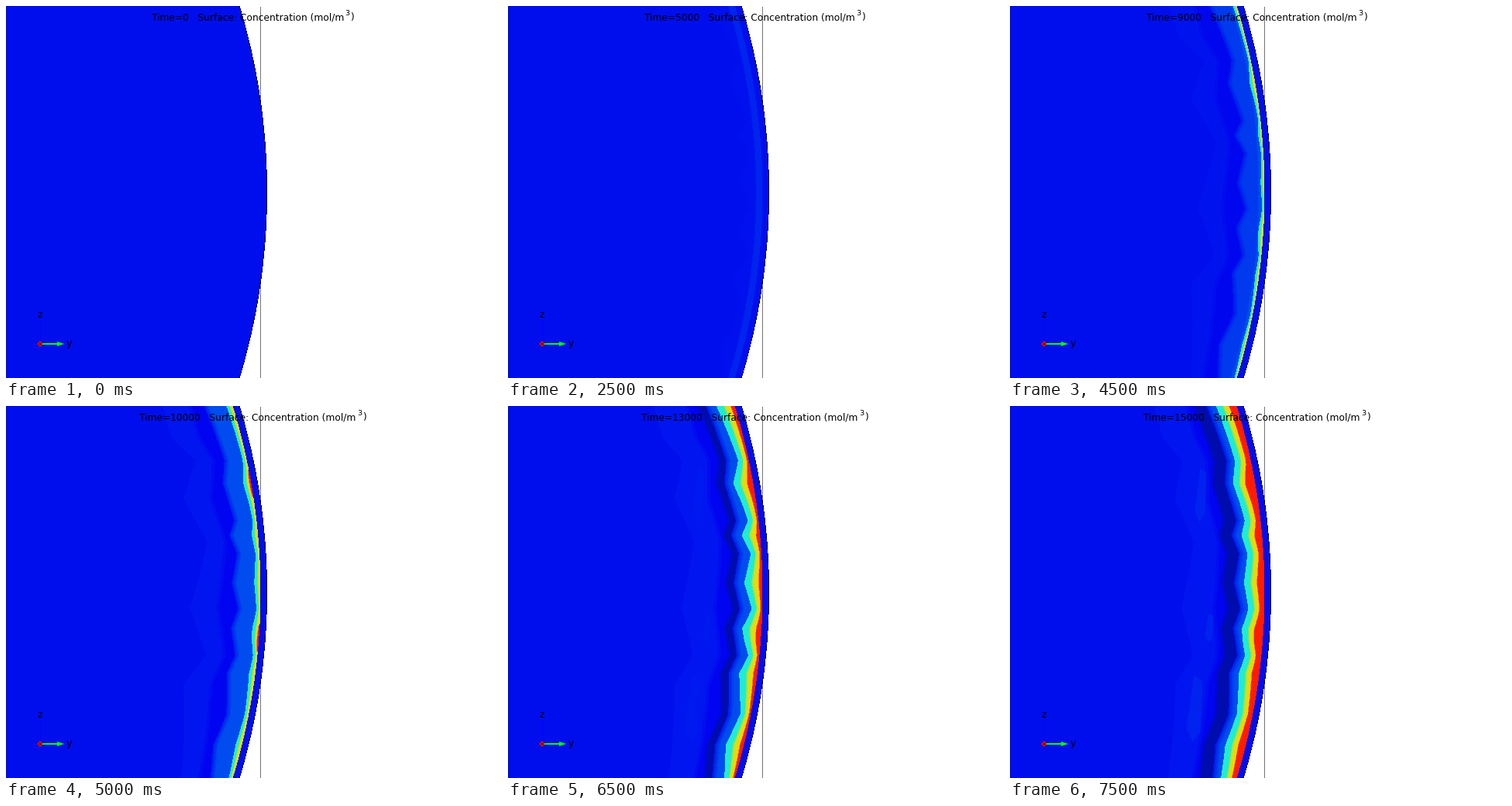
Animation of 640x480 px, one loop 8000 ms. Source, as a matplotlib script:

```python
import numpy as np
import matplotlib.pyplot as plt
from matplotlib.animation import ArtistAnimation
from matplotlib.patches import Circle, Polygon

W, H, DPI = 640, 480, 100
PX = 72 / DPI
STEPS, STEP_MS = 16, 500

BLUE, FAINT, DEEP = (0, 14, 238), (0, 21, 240), (0, 4, 240)
DARK, MID, CYAN = (0, 12, 172), (0, 76, 238), (32, 236, 208)
GREEN, YELLOW, ORANGE, RED = (140, 230, 96), (224, 220, 14), (255, 140, 0), (255, 28, 0)

rows = np.arange(0, H + 1)


def arc(tip, radius):
    return tip - radius + np.sqrt(radius**2 - (rows - 240) ** 2)


def zigzag(*turns):
    """Triangle wave along y: 1 at even turning points, 0 at odd ones."""
    return np.interp(rows, turns, [1 - i % 2 for i in range(len(turns))])


def ramp(t, start, end):
    return float(np.clip((t - start) / (end - start), 0, 1))


def lerp(a, b, f):
    return a + (b - a) * f


def mix(a, b, f):
    return tuple(lerp(p, q, f) for p, q in zip(a, b))


def rgb(color):
    return tuple(c / 255 for c in color)


outer, inner = arc(336.5, 829), arc(328, 820.5)
# The coarse mesh makes every front crooked at the same heights.
mesh = zigzag(0, 70, 100, 148, 167, 190, 228, 262, 287, 322, 345, 398, 438, 480)
lobes = zigzag(40, 70, 120, 175, 260, 322, 360, 480)
spots = sum(np.exp(-(((rows - y) / 20) ** 2)) for y in (100, 300))


def cyan_front(t):
    base = 20 * ramp(t, 7000, 15000) ** 1.5
    sway = np.interp(t, [7000, 10000, 12000, 15000], [0, 3, 12, 6])
    return np.maximum(base + sway * mesh + 2 * spots - 0.4, 0)


def mid_front(t):
    near = ramp(t, 7000, 10000)
    return lerp(14, 26, near) + lerp(16, 8, near) * mesh + 2 * ramp(t, 13000, 15000)


def dark_front(t):
    f = ramp(t, 11000, 15000)
    return lerp(28, 47, f) + lerp(11, 7, f) * mesh


def deep_front(t):
    f = ramp(t, 10000, 15000)
    return lerp(48, 62, f) + lerp(12, 8, f) * lobes


def faint_front(t):
    f = ramp(t, 9000, 13500)
    return lerp(59, 88, f) + lerp(26, 18, f) * lobes


def hot_front(cyan, t):
    bias = 4 * ramp(t, 8000, 12000) - 3
    spread = 0.6 * ramp(t, 11000, 15000) * np.maximum(cyan - 13, 0)
    heat = bias + spread + 2 * spots * ramp(t, 7000, 10000)
    return np.clip(heat, 0, np.maximum(cyan - 1, 0))


fig = plt.figure(figsize=(W / DPI, H / DPI), dpi=DPI, facecolor="white")
ax = fig.add_axes([0, 0, 1, 1])
ax.set(xlim=(0, W), ylim=(H, 0))
ax.axis("off")


def fill(left, right, color, z):
    return ax.fill_betweenx(rows, left, right, facecolor=rgb(color), edgecolor="none",
                            linewidth=0, antialiased=False, zorder=z)


def layer(depth, color):
    return fill(inner - depth, inner, color, 3)


def gradient(start, end, a, b, n):
    """Nested layers that shift from colour a to colour b."""
    return [layer(lerp(start, end, f), mix(a, b, f)) for f in np.linspace(0, 1, n)]


def island(x, y, w, h, color):
    pts = [(x, y - h), (x + w, y - h * 0.8), (x + w * 0.7, y + h * 0.7), (x - w * 0.2, y + h),
           (x - w, y + h * 0.6)]
    return ax.add_patch(Polygon(pts, facecolor=rgb(color), linewidth=0,
                                antialiased=False, zorder=3))


def label(x, y, text, size=12.28, **kw):
    return ax.text(x, y, text, fontsize=size * PX, family="DejaVu Sans",
                   color="black", va="baseline", zorder=6, **kw)


def far_field(t):
    """Weak ripples deep inside the disc."""
    far, late = ramp(t, 7000, 10000), ramp(t, 12000, 15000)
    if not far:
        return []
    pale, deep = mix(BLUE, FAINT, far), deep_front(t)
    art = [layer(faint_front(t), pale)]
    art += gradient(deep, deep - 8, pale, mix(BLUE, DEEP, far), 3)
    if late:
        tint = mix(FAINT, (0, 34, 240), late)
        art += [island(238, 390, 10, 42, tint), island(246, 115, 7, 34, tint),
                island(257, 286, 5, 18, tint)]
    return art


def near_field(t):
    """Dark undershoot and the medium blue band next to the membrane."""
    mid, art = mid_front(t), []
    if t > 10000:
        dark = dark_front(t)
        art += gradient(dark + 2, dark - 2, mix(DEEP, DARK, 0.3), DARK, 3)
        art += gradient(mid + 4, mid + 2, DARK, BLUE, 3)
    halo = ramp(t, 4000, 10000) ** 2
    core = ramp(t, 2500, 8000) ** 1.3
    if halo:
        art += gradient(mid + 2, mid - 4, mix(BLUE, MID, halo * 0.3), mix(BLUE, MID, halo), 5)
    if core:
        art += gradient(8, 6, mix(BLUE, MID, max(halo, core * 0.6)), mix(BLUE, MID, core), 3)
    return art


def hot_field(t):
    if t < 7000:
        return []
    cyan = cyan_front(t)
    hot = hot_front(cyan, t)
    span = np.maximum(cyan - hot - 1.5, 0)
    art = [layer(cyan, CYAN)]
    art += gradient(hot + 0.62 * span, hot + 0.52 * span, CYAN, GREEN, 3)
    art += gradient(hot + 0.52 * span, hot + 0.4 * span, GREEN, YELLOW, 4)
    art += [layer(np.where(hot > 0, hot + 0.7, 0), ORANGE), layer(hot, RED)]
    return art


def title(t):
    half = 130.5 + 4 * (len(str(t)) - 1)
    left, right = 318.5 - half, 318 + half
    return [
        label(left, 18, f"Time={t}   Surface: Concentration (mol/m"),
        label(right - 5, 12, "3", 9.5, ha="right"),
        label(right, 18, ")", ha="right"),
    ]


# Static scene
ax.plot([328, 328], [1, H], color="0.46", lw=PX, antialiased=False, zorder=1)
fill(0, outer, (0, 0, 0), 2)
fill(0, outer - 0.7, BLUE, 2.1)

# Axis triad
ax.plot([44, 44], [405, 436], color="#0000ff", lw=PX, zorder=5)
ax.plot([46, 67], [436, 436], color="#00ff00", lw=2 * PX, zorder=5)
ax.add_patch(Polygon([(66, 433), (75, 436), (66, 439)], color="#00ff00", lw=0, zorder=5))
ax.add_patch(Circle((44, 436), 3.2, color="#ff1400", lw=0, zorder=5))
for dy in (-2, 2):
    ax.plot([42, 46], [436 - dy, 436 + dy], color="#401010", lw=PX, zorder=5)
label(77.5, 439, "y")
label(40.7, 402, "z")

times = [1000 * i for i in range(STEPS)]
scenes = [far_field(t) + near_field(t) + hot_field(t) + title(t) for t in times]
anim = ArtistAnimation(fig, scenes, interval=STEP_MS, repeat=True, repeat_delay=0)
plt.show()
```
